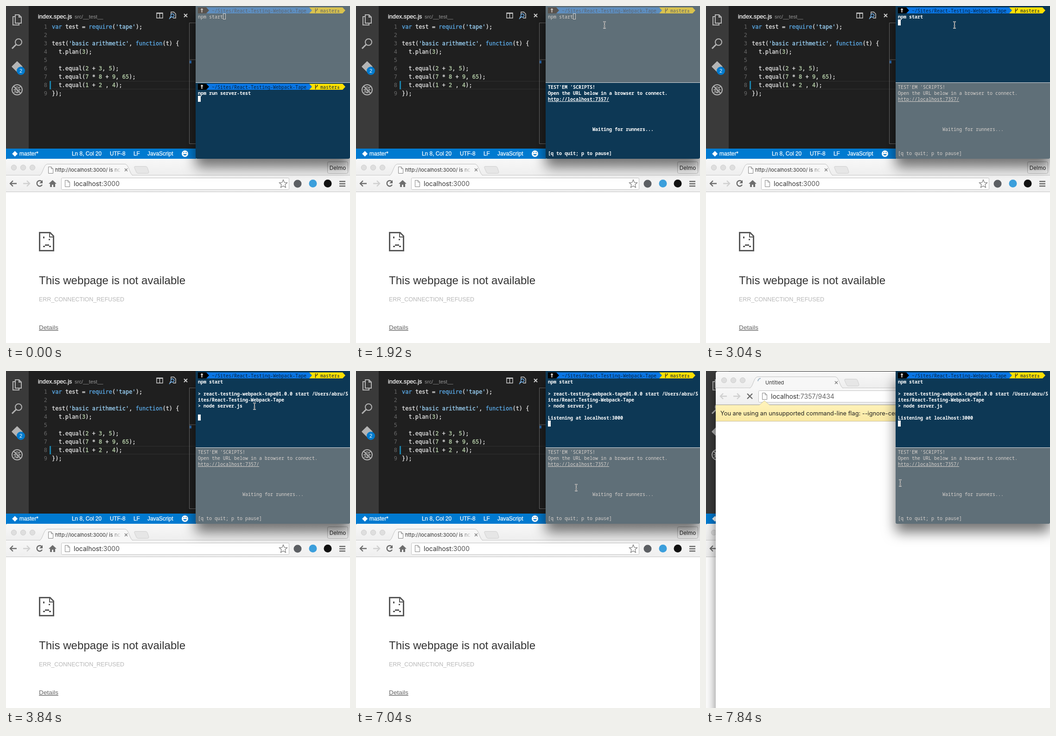
An HTML page for the animation above (8000 ms loop, 742 by 728 pixels).

```html
<!DOCTYPE html>
<html lang="en">
<head>
<meta charset="utf-8">
<title>Test runner session</title>
<style>
html, body { margin: 0; width: 100%; height: 100%; overflow: hidden; background: #fff; }
svg { display: block; width: 742px; height: 728px; }
text { white-space: pre; }
.sans { font-family: "Liberation Sans", Arial, sans-serif; }
.ui { font-family: Inter, "Open Sans", sans-serif; }
.code { font: 12px "DejaVu Sans Mono", monospace; fill: #e4e4e4; stroke: #e4e4e4; stroke-width: .35; }
.code .k { fill: #5aa9e6; stroke: #5aa9e6; }
.code .s { fill: #9ad1f5; stroke: #9ad1f5; }
.code .n { fill: #b5cea8; stroke: #b5cea8; }
.gutter { font: 12px "DejaVu Sans Mono", monospace; fill: #666; text-anchor: end; }
.heavy { stroke: #fff; stroke-width: .25; }
.term { font-family: "Noto Sans Mono", "DejaVu Sans Mono", monospace; font-size: 10px; fill: #fff; }
.prompt { font-weight: 400; fill: #062038; }
.line { fill: none; stroke: #6a6a6a; stroke-width: 2.4; }

/* One 8 s clock; hard switches use step-end. */
[class*="t-"] { animation: 8s step-end infinite; }
.t-launch { animation-name: until-log; }
.t-boot { animation-name: until-testem; }
.t-log { animation-name: log; }
.t-testem { animation-name: from-testem; }
.t-before { animation-name: until-focus; }
.t-after { animation-name: from-focus; }
.t-typed { animation-name: typed; }
.t-enter { animation-name: enter; }
.t-output { animation-name: from-output; }
.t-wait { animation-name: waiting; }
.t-listen { animation-name: from-listen; }
.t-popup { animation-name: from-popup; }
.t-top { animation-name: top-weight; }
.t-bottom { animation-name: bottom-weight; }
.t-mouse { animation-name: from-mouse; }
.move { animation: move 8s ease-in-out infinite; }
.spin { animation: spin 1s linear infinite; transform-origin: 118px 22px; }

@keyframes until-log { 0% { opacity: 1 } 5.8%, 100% { opacity: 0 } }
@keyframes log { 0% { opacity: 0 } 5.8% { opacity: 1 } 13.8%, 100% { opacity: 0 } }
@keyframes until-testem { 0% { opacity: 1 } 13.8%, 100% { opacity: 0 } }
@keyframes from-testem { 0% { opacity: 0 } 13.8%, 100% { opacity: 1 } }
@keyframes until-focus { 0% { opacity: 1 } 25.8%, 100% { opacity: 0 } }
@keyframes from-focus { 0% { opacity: 0 } 25.8%, 100% { opacity: 1 } }
@keyframes typed { 0% { opacity: 0 } 25.8% { opacity: 1 } 33.8%, 100% { opacity: 0 } }
@keyframes enter { 0% { opacity: 0 } 33.8% { opacity: 1 } 41.8%, 100% { opacity: 0 } }
@keyframes from-output { 0% { opacity: 0 } 41.8%, 100% { opacity: 1 } }
@keyframes waiting { 0% { opacity: 0 } 41.8% { opacity: 1 } 53.8%, 100% { opacity: 0 } }
@keyframes from-listen { 0% { opacity: 0 } 53.8%, 100% { opacity: 1 } }
@keyframes from-popup { 0% { opacity: 0 } 91.8%, 100% { opacity: 1 } }
@keyframes top-weight { 0% { font-weight: 400 } 25.8%, 100% { font-weight: 700 } }
@keyframes bottom-weight { 0% { font-weight: 700 } 25.8%, 100% { font-weight: 400 } }
@keyframes from-mouse { 0% { opacity: 0 } 17.8%, 100% { opacity: 1 } }
@keyframes move {
  0%, 17.8% { transform: translate(490px, 150px) }
  23.8%, 40% { transform: translate(536px, 41px) }
  46%, 54% { transform: translate(536px, 76px) }
  61%, 90% { transform: translate(475px, 252px) }
  96%, 100% { transform: translate(419px, 242px) }
}
@keyframes spin { to { transform: rotate(-360deg) } }
</style>
</head>
<body>
<svg viewBox="0 0 742 728">
<defs>
  <filter id="shadow" filterUnits="userSpaceOnUse" x="-80" y="-80" width="1000" height="900">
    <feDropShadow dx="0" dy="18" stdDeviation="14" flood-color="#000" flood-opacity=".55"/>
  </filter>
  <filter id="edge" filterUnits="userSpaceOnUse" x="-80" y="-80" width="1000" height="1000">
    <feDropShadow dx="0" dy="14" stdDeviation="12" flood-color="#000" flood-opacity=".5"/>
  </filter>
  <linearGradient id="strip" x2="0" y2="1">
    <stop stop-color="#f8f8f8"/><stop offset="1" stop-color="#eeeeee"/>
  </linearGradient>
  <linearGradient id="bar" x2="0" y2="1">
    <stop stop-color="#f7f7f7"/><stop offset="1" stop-color="#efefef"/>
  </linearGradient>
  <linearGradient id="fade">
    <stop stop-color="#f7f7f7" stop-opacity="0"/><stop offset="1" stop-color="#f7f7f7"/>
  </linearGradient>
  <linearGradient id="info" x2="0" y2="1">
    <stop stop-color="#fff2b8"/><stop offset="1" stop-color="#fae9a4"/>
  </linearGradient>

  <g id="browser">
    <rect x="-1" y="330" width="900" height="800" rx="5" fill="#fff"/>
    <path d="M-1 366V335q0-5 5-5H899V366Z" fill="url(#strip)"/>
    <path d="M-1 365.5H899" stroke="#c9c9c9"/>
    <rect x="-1" y="366" width="900" height="36" fill="url(#bar)"/>
    <path d="M-1 401.5H899" stroke="#c4c4c4"/>
    <g fill="#dedede" stroke="#cfcfcf">
      <circle cx="17" cy="349" r="5.7"/><circle cx="37" cy="349" r="5.7"/><circle cx="57" cy="349" r="5.7"/>
    </g>
    <path d="M72 366C79 365 81 342 89 341.5H257C265 342 267 365 274 366" fill="#f7f7f7" stroke="#c2c2c2"/>
    <path d="M279 346.5H301q3 0 4 3l3 9q0 3-3 3H285q-3 0-4-3l-4-9q-1-3 2-3Z" fill="#e6e6e6" stroke="#cfcfcf"/>
    <path d="M256 351l6 6m0-6l-6 6" stroke="#777" stroke-width="1.3"/>
  </g>
  <g id="sheet" fill="#fff" stroke="#858585">
    <path d="M-4.5-6.5H1.5L5.5-2.5V7.5H-4.5ZM1.5-6.5V-2.5H5.5"/>
  </g>
  <path id="arrow" d="M8 0H-6M0-6L-6 0L0 6" fill="none" stroke-width="2.4"/>
  <path id="beam" d="M-3-7Q0-7 0-5Q0-7 3-7M0-5V5M-3 7Q0 7 0 5Q0 7 3 7M-1.5 2H1.5" fill="none"/>

  <g id="prompt">
    <path d="M432 3H654L660 9.5L654 16H432Z" fill="#0a76e4"/>
    <path d="M414 3H432L438 9.5L432 16H414Z" fill="#000"/>
    <path d="M654 3H726L732 9.5L726 16H654L660 9.5Z" fill="#ffe000"/>
    <path d="M422.5 5V14M420 7.5H425" stroke="#fff" stroke-width="1.7"/>
    <path d="M667.5 5V15M671.5 5V8L667.5 11" fill="none" stroke="#222" stroke-width="1.2"/>
    <text class="prompt" x="444" y="14">~/Sites/React-Testing-Webpack-Tape</text>
    <text class="prompt" x="678" y="14">master±</text>
  </g>
  <rect id="block" width="6" height="13" fill="#fff"/>
</defs>

<!-- editor -->
<rect width="410" height="332" fill="#1f1f1f"/>
<rect width="49" height="308" fill="#3a3a3a"/>
<g fill="none" stroke="#b4b4b4" stroke-width="2">
  <path d="M19 23H15V41H28V38M20 19H28L33 24V37H20ZM28 19V24H33"/>
  <circle cx="27" cy="78" r="7"/><path d="M22 83L13 92" stroke-width="3"/>
  <circle cx="24" cy="181" r="11"/><path d="M16 173L32 189"/>
  <path d="M20 177q4-5 8 0v8q-4 5-8 0ZM16 181H20M28 181H32M17 187L20 185M28 177L31 174M24 177V187" stroke-width="1.5"/>
</g>
<rect x="15.5" y="122.5" width="17" height="17" rx="1" fill="#b4b4b4" transform="rotate(45 24 131)"/>
<circle cx="32" cy="140" r="9" fill="#007acc"/>
<g class="sans" fill="#fff">
  <text x="32" y="144" font-size="11" text-anchor="middle">2</text>
  <text class="heavy" x="69" y="27" font-size="12.7">index.spec.js</text>
  <text x="148" y="27" font-size="11.3" fill="#969696">src/__test__</text>
</g>
<g fill="none" stroke="#cfcfcf" stroke-width="1.4">
  <path d="M325 15H338V26H325ZM331.5 15V26M325 16H338"/>
  <path d="M356 18V13H362L366 17V26H360M353 24H356"/>
  <circle cx="359" cy="20.5" r="3.5" stroke="#75beff"/><path d="M356.5 23.5L352 28" stroke="#75beff"/>
  <path d="M384 17L391 24M391 17L384 24" stroke-width="2"/>
</g>
<path d="M97 162.5H409M97 179.5H409" stroke="#303030"/>
<rect x="94" y="162" width="3" height="18" fill="#1b81a8"/>
<g class="gutter">
  <text x="89" y="49">1</text><text x="89" y="67">2</text><text x="89" y="85">3</text>
  <text x="89" y="103">4</text><text x="89" y="121">5</text><text x="89" y="139">6</text>
  <text x="89" y="157">7</text><text x="89" y="175">8</text><text x="89" y="193">9</text>
</g>
<g class="code">
  <text x="99" y="49"><tspan class="k">var</tspan> test = <tspan class="k">require</tspan>(<tspan class="s">'tape'</tspan>);</text>
  <text x="99" y="85">test(<tspan class="s">'basic arithmetic'</tspan>, <tspan class="k">function</tspan>(t) {</text>
  <text x="113.4" y="103">t.plan(<tspan class="n">3</tspan>);</text>
  <text x="113.4" y="139">t.equal(<tspan class="n">2</tspan> + <tspan class="n">3</tspan>, <tspan class="n">5</tspan>);</text>
  <text x="113.4" y="157">t.equal(<tspan class="n">7</tspan> * <tspan class="n">8</tspan> + <tspan class="n">9</tspan>, <tspan class="n">65</tspan>);</text>
  <text x="113.4" y="175">t.equal(<tspan class="n">1</tspan> + <tspan class="n">2</tspan> , <tspan class="n">4</tspan>);</text>
  <text x="99" y="193">});</text>
</g>
<path d="M409 36.5H395.5V297.5H409M395.5 116H409" fill="none" stroke="#6e6e6e"/>
<rect x="396" y="118" width="4" height="6" fill="#2a66a8"/>
<rect y="308" width="410" height="24" fill="#007ad0"/>
<rect x="15" y="315" width="8.5" height="8.5" fill="#fff" transform="rotate(45 19.2 319.2)"/>
<g class="sans heavy" fill="#fff" font-size="11.9">
  <text x="29" y="323">master*</text><text x="142" y="323">Ln 8, Col 20</text>
  <text x="224" y="323">UTF-8</text><text x="275" y="323">LF</text><text x="305" y="323">JavaScript</text>
</g>
<circle cx="386" cy="319" r="7" fill="#fff"/>
<path d="M382 320q4 6 8 0Z" fill="#007ad0"/>
<circle cx="383.5" cy="316.5" r="1.1" fill="#007ad0"/><circle cx="388.5" cy="316.5" r="1.1" fill="#007ad0"/>

<!-- error page -->
<use href="#browser"/>
<use href="#sheet" x="96" y="354"/>
<g class="ui" fill="#333">
  <text x="106" y="358" font-size="11">http://localhost:3000/ is nc</text>
  <rect x="226" y="345" width="24" height="18" fill="url(#fade)"/>
  <rect x="693.5" y="336.5" width="44" height="25" rx="3" fill="#f4f4f4" stroke="#b5b5b5"/>
  <text x="715.5" y="354" font-size="11.7" text-anchor="middle" fill="#222">Delmo</text>
  <rect x="119.5" y="371.5" width="491" height="25" rx="2" fill="#fff" stroke="#c2c2c2"/>
  <text x="146" y="389" font-size="14">localhost<tspan fill="#555">:3000</tspan></text>
</g>
<use href="#sheet" x="132" y="383"/>
<use href="#arrow" x="15" y="383.5" stroke="#6e6e6e"/>
<use href="#arrow" transform="translate(45 383.5) scale(-1 1)" stroke="#d0d0d0"/>
<path class="line" d="M77 379A6 6 0 1 0 78 386"/><path d="M79 376V383H72Z" fill="#6a6a6a"/>
<path d="M92 384L100.5 376L109 384H106V391H102V386H99V391H95V384Z" fill="#6e6e6e"/>
<path d="M598 375.5L600.5 381.3L606.5 381.8L602 385.8L603.4 392L598 388.7L592.6 392L594 385.8L589.5 381.8L595.5 381.3Z" fill="#fff" stroke="#777" stroke-width="1.2"/>
<circle cx="629" cy="384" r="8.5" fill="#5c5f63"/>
<circle cx="662" cy="383.5" r="8.5" fill="#3c9fdc"/>
<circle cx="694" cy="383.5" r="8.5" fill="#111"/>
<path class="line" d="M719 379H732M719 384H732M719 389H732"/>
<g fill="none" stroke="#585858">
  <path d="M72.5 489.5H95L102.5 497V528.5H72.5Z" stroke-width="3"/>
  <path d="M94 490V499H102" stroke-width="2"/>
</g>
<path d="M80 498h3v4h-3ZM92 503h3v3h-3ZM84 515h9v3h-9ZM80 518h4v3h-4ZM93 518h4v3h-4Z" fill="#585858"/>
<g class="sans">
  <text x="71" y="601" font-size="24.1" fill="#333">This webpage is not available</text>
  <text x="71" y="638" font-size="12.5" fill="#b8b8b8">ERR_CONNECTION_REFUSED</text>
  <text x="71" y="699" font-size="13.7" fill="#666" text-decoration="underline">Details</text>
</g>

<!-- launched browser -->
<g class="t-popup">
  <g filter="url(#edge)"><use href="#browser" transform="translate(22 -329)"/></g>
  <g class="spin">
    <path d="M112 22A6 6 0 0 1 118 16" transform="rotate(-58 118 22)" fill="none" stroke="#9db3c4" stroke-width="1.8"/>
  </g>
  <use href="#arrow" x="37" y="54.5" stroke="#d0d0d0"/>
  <use href="#arrow" transform="translate(67 54.5) scale(-1 1)" stroke="#d0d0d0"/>
  <path class="line" d="M89 49L100 60M100 49L89 60"/>
  <rect x="113.5" y="42.5" width="500" height="25" rx="2" fill="#fff" stroke="#c2c2c2"/>
  <use href="#sheet" x="126" y="54"/>
  <rect x="21" y="73" width="721" height="35" fill="url(#info)"/>
  <path d="M21 73.5H115L126 64L137 73.5H742" fill="#fff2b8" stroke="#c9c3a5"/>
  <path d="M21 108.5H742" stroke="#c8c0a0"/>
  <g class="ui" fill="#333">
    <text x="128" y="29" font-size="11">Untitled</text>
    <text x="140" y="60" font-size="14">localhost<tspan fill="#666">:7357/9434</tspan></text>
    <text x="31" y="96" font-size="12.8" fill="#222">You are using an unsupported command-line flag: --ignore-certificate-errors</text>
  </g>
</g>

<!-- terminal -->
<path d="M409 0H742V326q0 4-4 4H413q-4 0-4-4Z" fill="#0a3854" filter="url(#shadow)"/>
<g class="term t-top">
  <use href="#prompt"/>
  <text x="414" y="27">npm start</text>
  <rect class="t-before" x="468.5" y="16.5" width="5" height="12" fill="none" stroke="#fff"/>
  <use class="t-typed" href="#block" x="468" y="16"/>
  <use class="t-enter" href="#block" x="414" y="29"/>
  <g class="t-output">
    <text x="414" y="53">&gt; react-testing-webpack-tape@1.0.0 start /Users/abru/S</text>
    <text x="414" y="66">ites/React-Testing-Webpack-Tape</text>
    <text x="414" y="79">&gt; node server.js</text>
  </g>
  <use class="t-wait" href="#block" x="414" y="94"/>
  <g class="t-listen">
    <text x="414" y="105">Listening at localhost:3000</text>
    <use href="#block" x="414" y="107"/>
  </g>
</g>
<g class="term t-bottom">
  <g class="t-boot">
    <use href="#prompt" y="165"/>
    <text x="414" y="192">npm run server-test</text>
    <use class="t-launch" href="#block" x="414" y="194"/>
    <g class="t-log">
      <text x="414" y="218">&gt; react-testing-webpack-tape@1.0.0 server-test /Users/</text>
      <text x="414" y="231">abru/Sites/React-Testing-Webpack-Tape</text>
      <text x="414" y="244">&gt; testem</text>
      <use href="#block" x="414" y="259"/>
    </g>
  </g>
  <g class="t-testem">
    <text x="414" y="179">TEST'EM 'SCRIPTS!</text>
    <text x="414" y="192">Open the URL below in a browser to connect.</text>
    <text x="414" y="205" text-decoration="underline">http://localhost:7357/</text>
    <text x="510" y="270">Waiting for runners...</text>
    <text x="414" y="322">[q to quit; p to pause]</text>
  </g>
</g>
<g fill="#b2a69c" fill-opacity=".5">
  <rect class="t-before" x="409" width="333" height="165"/>
  <path class="t-after" d="M409 166H742V326q0 4-4 4H413q-4 0-4-4Z"/>
</g>
<path d="M409 165.5H742" stroke="#d5dade"/>

<!-- pointer -->
<g class="t-mouse"><g class="move">
  <use href="#beam" stroke="#fff" stroke-width="2"/>
  <use href="#beam" stroke="#222" stroke-width=".7"/>
</g></g>
</svg>
</body>
</html>
```
